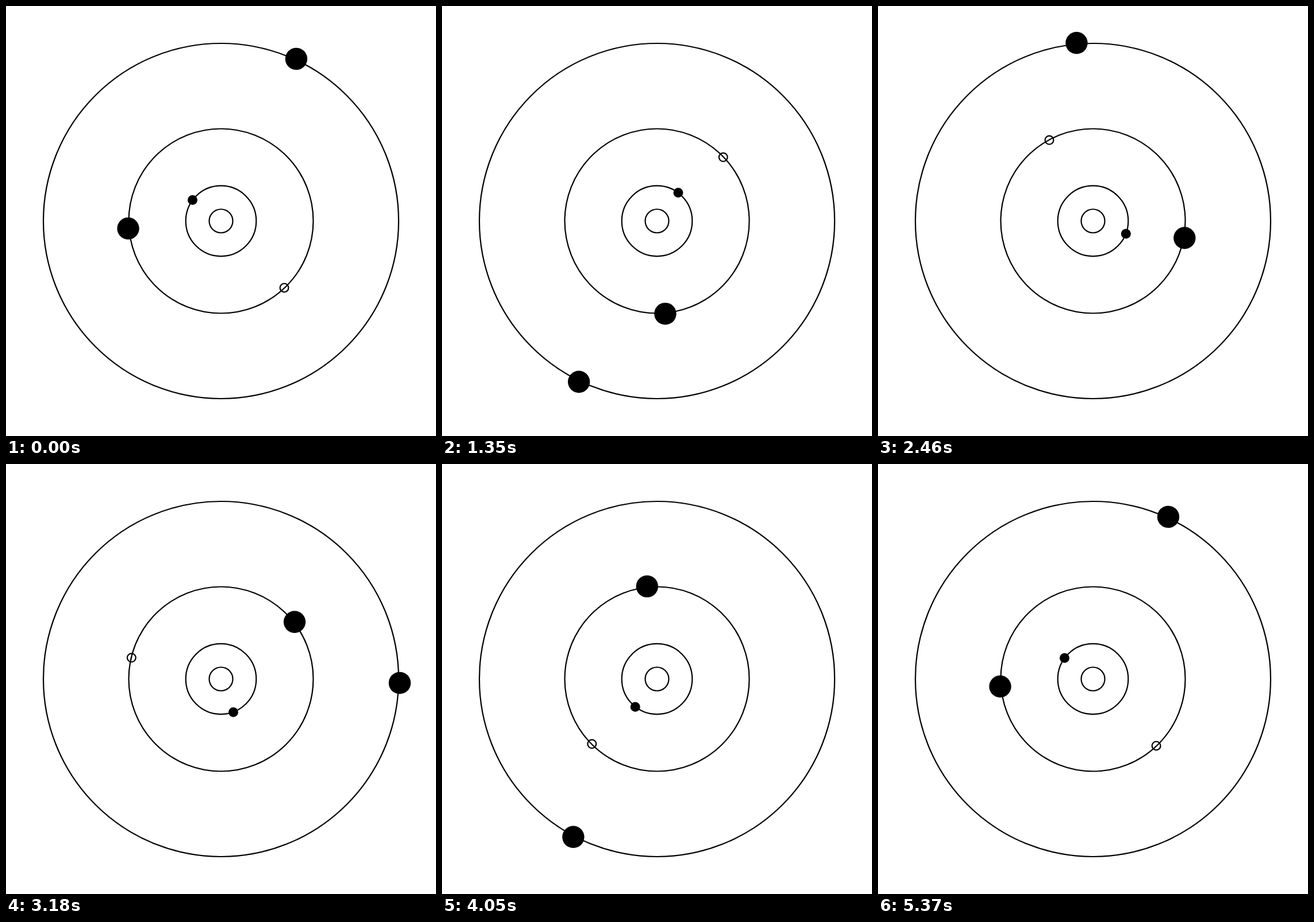
An HTML page that plays this animation: 748 by 748 pixels, repeating every 5.4 s.

```html
<!DOCTYPE html>
<html lang="en">
<head>
<meta charset="utf-8">
<title>Orbits</title>
<style>
  html, body { margin: 0; width: 100%; height: 100%; overflow: hidden; background: #fff; }
  svg { display: block; width: 100%; height: 100%; }
  .line { fill: none; stroke: #000; stroke-width: 2.2; }
</style>
</head>
<body>
<svg id="stage" viewBox="0 0 748 748"></svg>
<script>
const CENTER = 374;
const STEP = 30;
const STEPS = 180;
const stage = document.getElementById('stage');

function addCircle(r, className) {
  const circle = document.createElementNS('http://www.w3.org/2000/svg', 'circle');
  circle.setAttribute('cx', CENTER);
  circle.setAttribute('cy', CENTER);
  circle.setAttribute('r', r);
  circle.setAttribute('class', className);
  stage.append(circle);
  return circle;
}

[20.5, 61.3, 160.5, 309].forEach(r => addCircle(r, 'line'));

// start is in degrees, turns is signed revolutions per loop
const bodies = [
  { orbit: 311, start: -65.1, turns: 2, size: 19.2, className: 'dot' },
  { orbit: 162, start: 175.4, turns: -1, size: 19.2, className: 'dot' },
  { orbit: 61.5, start: 216.4, turns: 1, size: 8.5, className: 'dot' },
  { orbit: 160, start: 46.55, turns: -1, size: 7.4, className: 'line' }
];
for (const body of bodies) body.node = addCircle(body.size, body.className);

function render(ms) {
  const step = Math.floor(ms / STEP) % STEPS;
  // The first and last steps share the same pose.
  const progress = step / (STEPS - 1);
  for (const { orbit, start, turns, node } of bodies) {
    const angle = (start + 360 * turns * progress) * Math.PI / 180;
    node.setAttribute('cx', CENTER + orbit * Math.cos(angle));
    node.setAttribute('cy', CENTER + orbit * Math.sin(angle));
  }
}

let origin;
function tick(now) {
  origin ??= now;
  render(now - origin);
  requestAnimationFrame(tick);
}
render(0);
requestAnimationFrame(tick);
</script>
</body>
</html>
```
